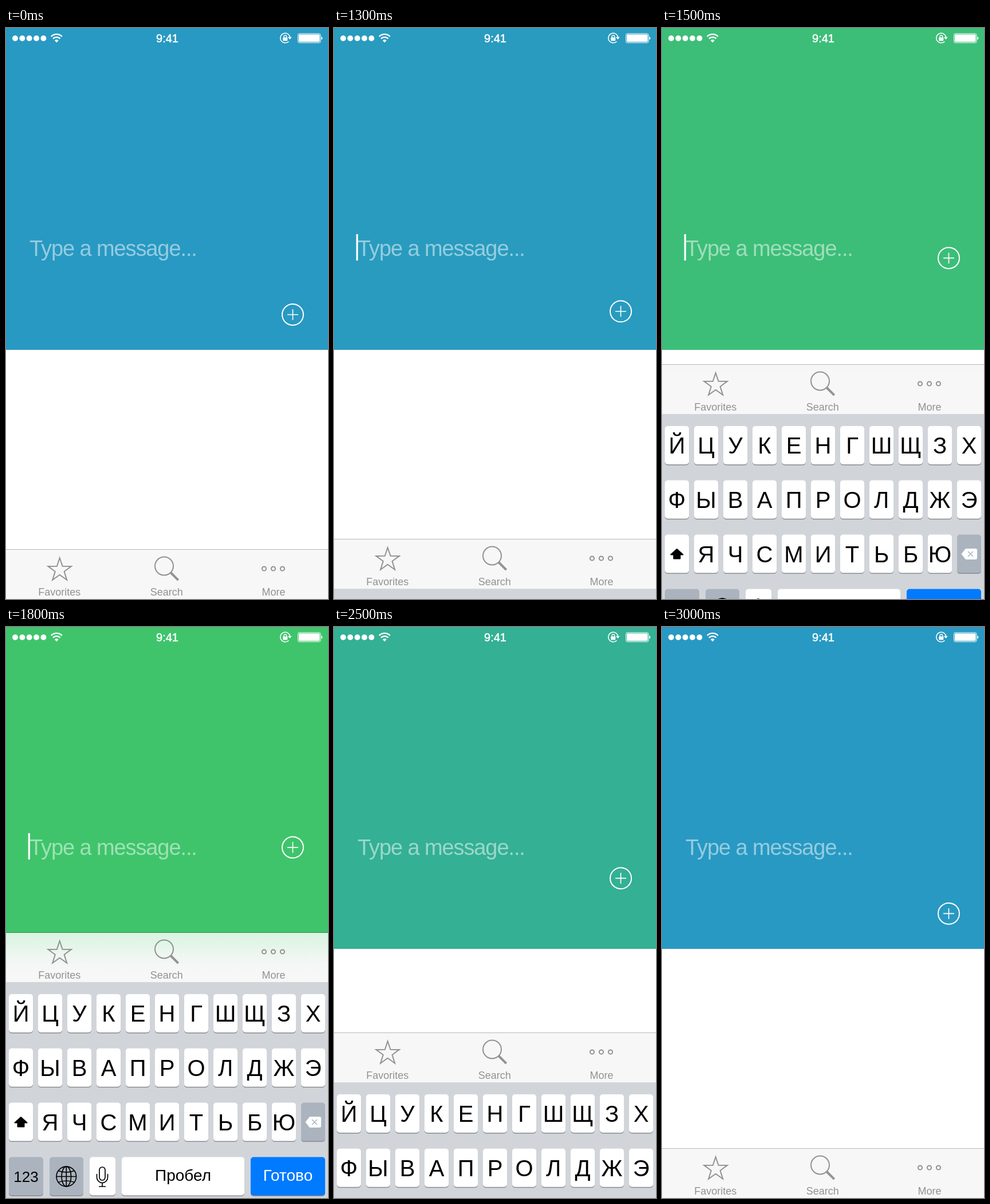
An HTML page that plays this animation: 562 px wide and 997 px high, repeating every 3400 ms.

```html
<!DOCTYPE html>
<html lang="en">
<head>
<meta charset="utf-8">
<style>
  html, body { margin: 0; width: 100%; height: 100%; overflow: hidden; background: #fff; }
  svg { display: block; width: 562px; height: 997px; font-family: "Liberation Sans", Arial, sans-serif; }
  .line { fill: none; stroke: #929292; stroke-width: 2; }
  .white { fill: none; stroke: #fff; stroke-width: 2; }
  .thin { fill: none; stroke: #000; stroke-width: 1.7; }
  .mid { text-anchor: middle; }
</style>
</head>
<body>
<svg viewBox="0 0 562 997">
  <defs><linearGradient id="tint" x1="0" y1="0" x2="0" y2="1"></linearGradient></defs>
  <rect id="panel" width="562" height="562"/>

  <g fill="#fff">
    <g id="dots"></g>
    <path d="M88.3 25.5l-3.4-3.8a4.8 4.8 0 0 1 6.8 0z"/>
    <path class="white" style="stroke-width:2.4" d="M78.8 14.8a13.5 13.5 0 0 1 19 0M82 18.6a9 9 0 0 1 12.6 0"/>
    <text class="mid" x="281.5" y="25" font-size="20" stroke="#fff" stroke-width=".5">9:41</text>
    <path class="white" style="stroke-width:1.5" d="M493.5 23.4a8.5 8.5 0 1 1 2.2-7.4"/>
    <path d="M491.8 15.7h7l-3.5 4.3z"/>
    <rect x="483.3" y="16.4" width="8" height="6" rx=".8"/>
    <path class="white" style="stroke-width:1.4" d="M485 17v-2a2.3 2.3 0 0 1 4.6 0v2"/>
    <rect x="509.5" y="9.8" width="39.5" height="16" rx="2.5" class="white" style="stroke-width:1"/>
    <rect x="511" y="11.3" width="36.5" height="13" rx="1.3"/>
    <path d="M550.3 15q2 .4 2 2.8t-2 2.8z"/>
  </g>

  <text x="41" y="398" font-size="38" letter-spacing="-1.1" fill="#fff" fill-opacity=".5">Type a message...</text>
  <rect id="caret" x="38.7" y="360" width="3.3" height="46" fill="#fff"/>
  <g id="plus">
    <circle class="white" r="18.5"/>
    <path class="white" style="stroke-width:1.6" d="M-9.5 0h19M0-9.5v19"/>
  </g>

  <g id="dock">
    <rect width="562" height="1" fill-opacity=".28"/>
    <rect y="1" width="562" height="86" fill="#f7f7f7"/>
    <rect y="1" width="562" height="86" fill="url(#tint)"/>
    <path id="star" class="line"/>
    <circle class="line" cx="276" cy="29.5" r="16"/>
    <path class="line" style="stroke-width:4" d="M287.5 41l13.2 13.2"/>
    <g class="line">
      <circle cx="450.5" cy="34" r="3.6"/><circle cx="466.5" cy="34" r="3.6"/><circle cx="482.5" cy="34" r="3.6"/>
    </g>
    <g class="mid" font-size="18" fill="#929292">
      <text x="93.3" y="81">Favorites</text><text x="280.3" y="81">Search</text><text x="467" y="81">More</text>
    </g>

    <g transform="translate(0 87)">
      <rect width="562" height="400" fill="#d1d5da"/>
      <g id="keys"></g>
      <path d="M26 236l10.5 9.5h-5v7h-11v-7h-5z" stroke="#000" stroke-width="2" stroke-linejoin="round"/>
      <path d="M530 235h17q3 0 3 3v13q0 3-3 3h-17l-7.5-9.5z" fill="#fff"/>
      <path d="M534 240l9 9m0-9l-9 9" stroke="#abb4be" stroke-width="1.5"/>
      <g class="thin" transform="translate(105.3 339.5)">
        <circle r="17.3"/><ellipse rx="8.3" ry="17.3"/>
        <path d="M0-17.3v34.6M-17.3 0h34.6M-14-10q14 5 28 0M-14 10q14-5 28 0"/>
      </g>
      <g class="thin">
        <rect x="163" y="323" width="10" height="23" rx="5"/>
        <path d="M158.5 335v6a9.5 9.5 0 0 0 19 0v-6M168 351v6M162 357h12"/>
      </g>
    </g>
  </g>
</svg>
<script>
const $ = id => document.getElementById(id);
const LOOP = 3400, STEP = 100, SHOW = 1300, HIDE = 2400;
const BLUE = [40, 153, 194], GREEN = [63, 196, 107];

function add(parent, tag, attrs, text) {
  const el = document.createElementNS("http://www.w3.org/2000/svg", tag);
  for (const name in attrs) el.setAttribute(name, attrs[name]);
  if (text) el.textContent = text;
  return parent.appendChild(el);
}

function key(x, y, w, fill, label, size = 40, base = 48) {
  const shape = { x, width: w, height: 67, rx: 5 };
  add($("keys"), "rect", { ...shape, y: y + 1.5, fill: "#898c90" });
  const face = add($("keys"), "rect", { ...shape, y, fill });
  const text = add($("keys"), "text", { class: "mid", x: x + w / 2, y: y + base, "font-size": size }, label);
  return { face, text };
}

const WHITE = "#fff", GREY = "#abb4be";
["ЙЦУКЕНГШЩЗХ", "ФЫВАПРОЛДЖЭ", " ЯЧСМИТЬБЮ "].forEach((row, r) =>
  [...row].forEach((c, i) => key(5 + 51 * i, 21 + 94.8 * r, 42, r == 2 && i == 10 ? GREY : WHITE, c.trim())));
key(5, 305.5, 60, GREY, "123", 26, 43.5);
key(76, 305.5, 59, GREY);
key(146, 305.5, 45, WHITE);
key(202, 305.5, 214, WHITE, "Пробел", 28, 41.5);
const done = key(427, 305.5, 130, WHITE, "Готово", 28, 41.5);

for (let i = 0; i < 5; i++) add($("dots"), "circle", { cx: 16 + 12.35 * i, cy: 18, r: 5 });

const points = Array.from({ length: 10 }, (_, i) => {
  const r = i % 2 ? 8.3 : 21.3, a = i * Math.PI / 5;
  return [93.7 + r * Math.sin(a), 36.5 - r * Math.cos(a)];
});
$("star").setAttribute("d", "M" + points.join("L") + "Z");

const stops = Array.from({ length: 9 }, (_, i) =>
  add($("tint"), "stop", { offset: i / 8, "stop-color": "rgb(63,230,110)" }));

const clamp = v => Math.max(0, Math.min(1, v));

// Critically damped spring from 0 to 1
function spring(ms, rate) {
  const x = Math.max(0, ms) / 1000 * rate;
  return 1 - (1 + x) * Math.exp(-x);
}

function draw(t) {
  const p = t < HIDE ? spring(t - SHOW + 23.2, 15.2) : 1 - spring(t - HIDE, 15.75);
  const top = Math.ceil(909.9 - 379 * p);
  $("dock").setAttribute("transform", `translate(0 ${top})`);
  $("plus").setAttribute("transform", `translate(500.5 ${500.5 - 116 * p})`);
  $("panel").setAttribute("fill", `rgb(${BLUE.map((c, i) => Math.round(c + (GREEN[i] - c) * p))})`);

  // The panel shows through the bar as a soft blur
  const strength = .17 + .07 * clamp((t - 1800) / 300);
  stops.forEach((s, i) =>
    s.setAttribute("stop-opacity", strength / (1 + Math.exp((top + i * 10.75 - 561) / 12))));

  const blink = t < 2300 ? clamp((2000 - t) / 200) : 1;
  $("caret").setAttribute("opacity", t >= SHOW && t <= HIDE ? blink : 0);

  const pressed = t >= 2300;
  done.face.setAttribute("fill", pressed ? WHITE : "#007aff");
  done.text.setAttribute("fill", pressed ? "#000" : WHITE);
}

let start;
function tick(now) {
  start ??= now;
  draw(Math.floor((now - start) % LOOP / STEP) * STEP);
  requestAnimationFrame(tick);
}
draw(0);
requestAnimationFrame(tick);
</script>
</body>
</html>
```
